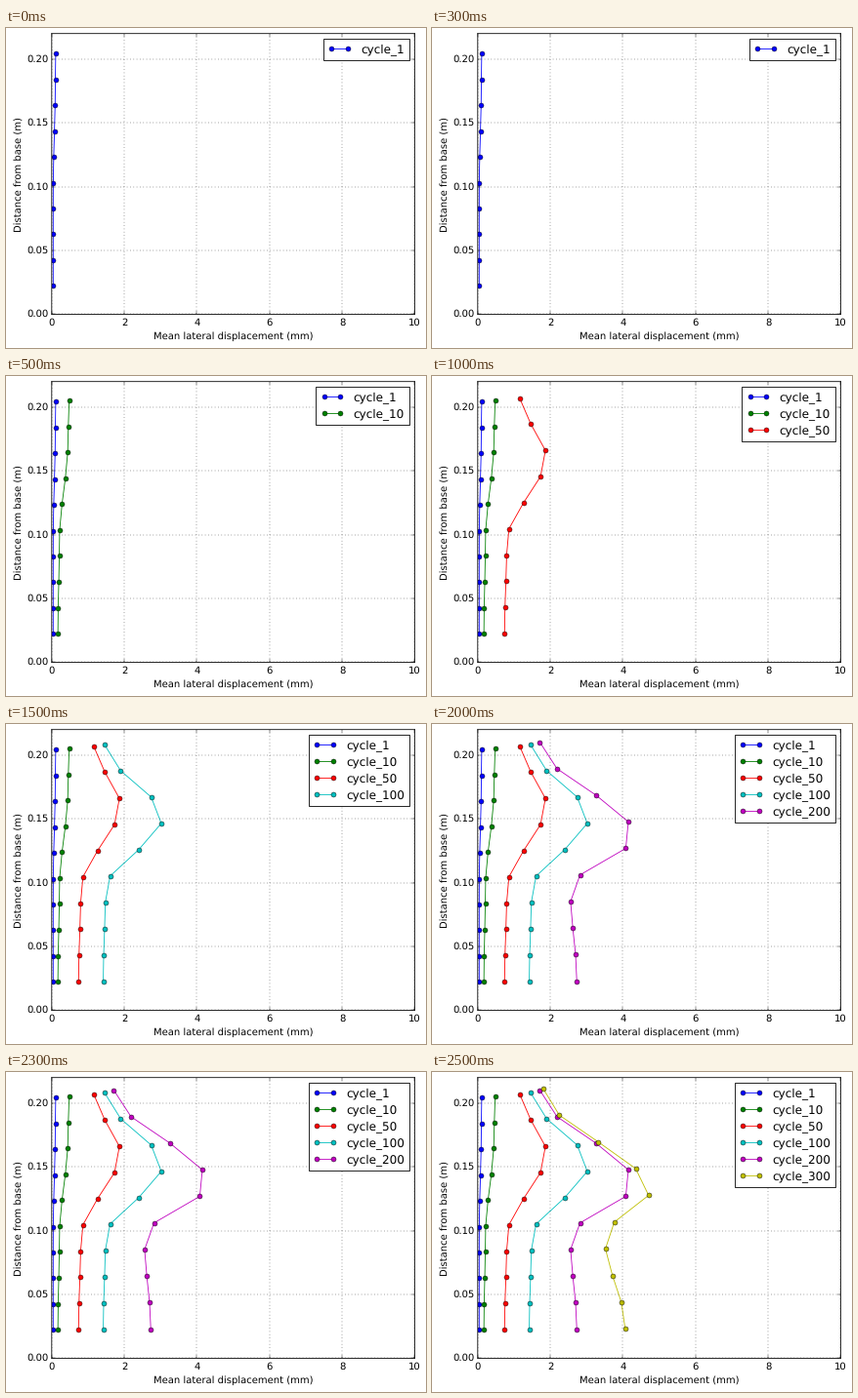
A matplotlib script that plays this animation: 430 px wide and 328 px high, repeating every 3000 ms.

```python
import numpy as np
import matplotlib.pyplot as plt
from matplotlib.animation import FuncAnimation

W, H, DPI = 430, 328, 60
LEVELS = 10        # measuring points per profile
WAIST_LEVEL = 3.5  # level of the narrowest part below the bulge

plt.style.use("classic")
plt.rcParams.update({
    "font.family": "DejaVu Sans",
    "text.hinting": "none",
    "figure.facecolor": "white",
    "savefig.facecolor": "white",
    "savefig.dpi": "figure",
    "xtick.major.pad": 5,
    "legend.labelspacing": 0.42,
    "legend.borderaxespad": 0.47,
})

# cycle, colour, then displacements in mm: foot, waist, (bulge level, bulge), top
PROFILES = [
    (1, "b", 0.04, 0.04, (8, 0.10), 0.11),
    (10, "g", 0.17, 0.21, (7.5, 0.45), 0.48),
    (50, "r", 0.74, 0.80, (6.8, 1.88), 1.155),
    (100, "c", 1.42, 1.48, (6.2, 3.04), 1.45),
    (200, "m", 2.73, 2.55, (5.45, 4.30), 1.71),
    (300, "y", 4.065, 3.49, (5.1, 4.72), 1.80),
]


def ease(x, x0, x1):
    """Cosine step from 0 at x0 to 1 at x1."""
    t = np.clip((x - x0) / (x1 - x0), 0, 1)
    return (1 - np.cos(np.pi * t)) / 2


def displacement(foot, waist, bulge, top):
    level = np.arange(LEVELS)
    peak_level, peak = bulge
    return (foot
            + (waist - foot) * ease(level, 0, WAIST_LEVEL)
            + (peak - waist) * ease(level, WAIST_LEVEL, peak_level)
            + (top - peak) * ease(level, peak_level, LEVELS - 1))


def heights(cycle):
    """The column stretches slightly as the cycles add up."""
    growth = (cycle / 300) ** 0.45
    return np.linspace(0.0222 + 0.0007 * growth, 0.2035 + 0.008 * growth, LEVELS)


fig = plt.figure(figsize=(W / DPI, H / DPI), dpi=DPI)
ax = fig.add_axes([46.8 / W, 34.6 / H, 371.6 / W, 287.7 / H])
ax.set_xlim(0, 10)
ax.set_ylim(0, 0.22)
ax.set_xticks(range(0, 11, 2))
ax.set_yticks(np.arange(5) * 0.05)
ax.set_xlabel("Mean lateral displacement (mm)")
ax.set_ylabel("Distance from base (m)", labelpad=4)
ax.grid(True)
plt.setp(list(ax.spines.values()), snap=False)

lines = []
for cycle, color, *shape in PROFILES:
    lines += ax.plot(displacement(*shape), heights(cycle), color + "o-",
                     label=f"cycle_{cycle}")


def update(frame):
    """Show the profiles up to this frame and refresh the legend."""
    for i, line in enumerate(lines):
        line.set_visible(i <= frame)
    legend = ax.legend(handles=lines[:frame + 1], loc="upper right")
    return [*lines, legend]


anim = FuncAnimation(fig, update, frames=len(lines), interval=500,
                     repeat=True, repeat_delay=0, blit=False)
plt.show()
```
